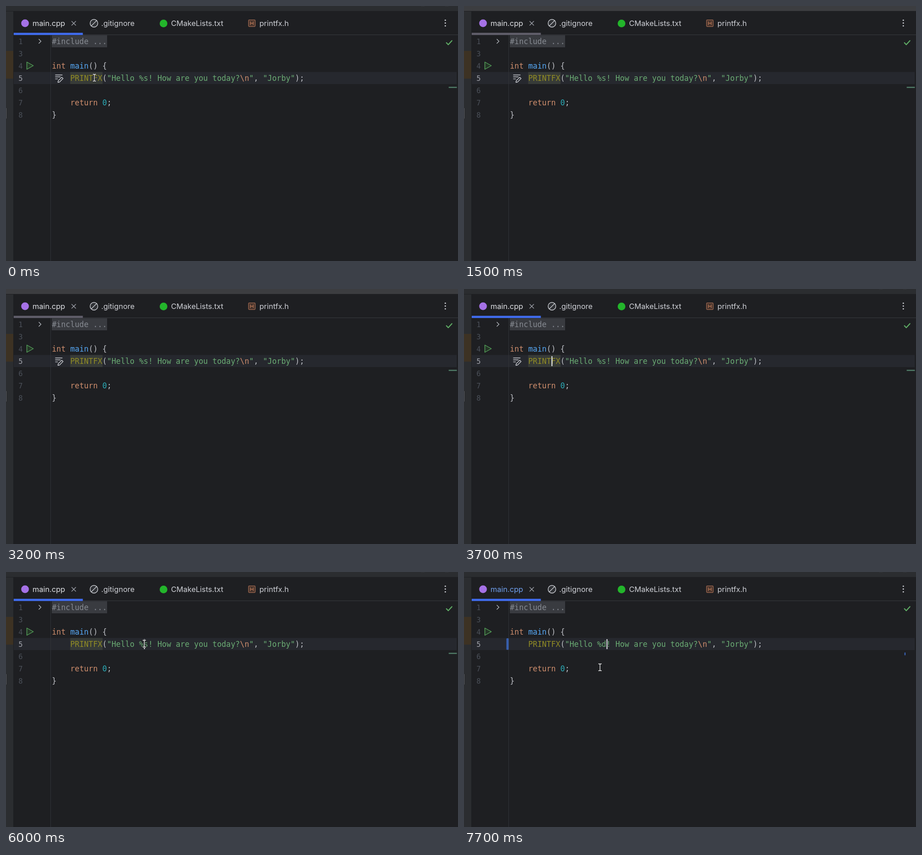
An HTML page for the animation above (8 s loop, 997 by 562 pixels).

```html
<!DOCTYPE html>
<html lang="en">
<head>
<meta charset="utf-8">
<title>Code editor</title>
<style>
  html, body { margin: 0; width: 100%; height: 100%; overflow: hidden; background: #1e1f22; }
  svg { display: block; width: 997px; height: 562px; }
  text { white-space: pre; }
  .code { font: 16.81px "DejaVu Sans Mono", "Noto Sans Mono", monospace; }
  .tab { font: 16.5px Inter, "Open Sans", sans-serif; fill: #ced0d6; }
  .line { fill: none; stroke: #ced0d6; stroke-width: 1.4; stroke-linecap: round; stroke-linejoin: round; }
</style>
</head>
<body>
<svg viewBox="0 0 997 562">
  <rect width="997" height="562" fill="#1e1f22"/>
  <rect id="titleBar" width="997" height="11"/>
  <path id="titleMarks" d="M916 0h7M969 0h7" stroke="#3d3f43"/>
  <rect y="12" width="16" height="550" fill="#2b2d30"/>
  <rect y="99" width="16" height="61" fill="#3d3223"/>
  <rect y="225" width="1" height="23" fill="#5a5d63"/>

  <!-- tabs -->
  <rect x="17" y="63" width="980" height="1" fill="#393b40"/>
  <rect id="underline" x="17" y="59" width="152.5" height="5"/>
  <circle cx="42" cy="38" r="8.5" fill="#a571e6"/>
  <path class="line" d="M145 33.7l8.8 8.8m0-8.8l-8.8 8.8" stroke-width="1.3" style="stroke:#9da0a8"/>
  <g class="line"><circle cx="194" cy="38" r="8.5" fill="#303236"/><path d="M188 44l12-12"/></g>
  <circle cx="347.5" cy="38.5" r="8.5" fill="#23b52b"/>
  <rect x="535" y="30.7" width="14.6" height="14.6" rx="1.5" fill="#45322b" stroke="#a56d53" stroke-width="1.3"/>
  <path d="M539.2 34v8M545.4 34v8M539.2 38h6.2" stroke="#b87858" stroke-width="1.3"/>
  <text id="tabName" class="tab" x="58.5" y="44">main.cpp</text>
  <text class="tab" x="210" y="44">.gitignore</text>
  <text class="tab" x="364" y="44">CMakeLists.txt</text>
  <text class="tab" x="559" y="44">printfx.h</text>
  <g fill="#ced0d6"><circle cx="969" cy="31.3" r="1.5"/><circle cx="969" cy="37.5" r="1.5"/><circle cx="969" cy="43.7" r="1.5"/></g>

  <!-- editor -->
  <rect x="17" y="145.5" width="977" height="26.5" fill="#26282e"/>
  <rect x="98" y="64" width="1" height="498" fill="#313438"/>
  <rect x="101" y="64.5" width="122" height="26.5" fill="#393b40"/>
  <rect id="highlight" x="141.5" y="145.5" width="71.5" height="26.5" fill="#373b38"/>
  <rect id="changeBar" x="93.5" y="146" width="5" height="25.5" rx="1.5" fill="#375fad"/>
  <path class="line" d="M72.6 73.3l4.6 4.5-4.6 4.5" style="stroke:#b4b8bf"/>
  <path class="line" d="M46 123.5v16l14.3-8z" style="stroke:#57a55c;fill:#253627"/>
  <g id="pencil" class="line">
    <path d="M109 152h15M109 156.3h11M109 160.6h5"/>
    <path d="M114.5 168.3l.8-3.8 7.8-7.6 2.8 2.8-7.7 7.8z"/>
  </g>
  <path class="line" d="M971.5 81l4 4.2 8-8.8" style="stroke:#5fad65;stroke-width:2.3"/>
  <rect id="mark" x="976.5" y="178" width="18" height="2.6" fill="#4f7a66"/>
  <rect id="tick" x="971.5" y="177.5" width="2.5" height="6" fill="#375fad"/>
  <g id="code" class="code"></g>
  <rect id="caret" y="148" width="2.2" height="22" fill="#dfe1e5"/>
  <g id="mouse" fill="none" stroke-linecap="square">
    <path d="M-3 -7.5h2l1 1 1-1h2M0 -6.5v13M-3 7.5h2l1-1 1 1h2" stroke="#15161a" stroke-width="3.2"/>
    <path d="M-3 -7.5h2l1 1 1-1h2M0 -6.5v13M-3 7.5h2l1-1 1 1h2" stroke="#fff" stroke-width="1.3"/>
  </g>
</svg>
<script>
const LOOP = 8000, LEFT = 101.2, CHAR = 10.12, ROW = 27;
const $ = id => document.getElementById(id);
const PLAIN = '#bcbec4', KEYWORD = '#cf8e6d', STRING = '#6aab73';

function addText(x, row, str, fill) {
  const el = document.createElementNS('http://www.w3.org/2000/svg', 'text');
  el.setAttribute('x', x);
  el.setAttribute('y', 84 + row * ROW);
  el.setAttribute('fill', fill);
  el.textContent = str;
  $('code').append(el);
  return el;
}
const colX = col => LEFT + col * CHAR;
const token = (row, col, str, fill) => addText(colX(col), row, str, fill);

[1, 3, 4, 5, 6, 7, 8].forEach((n, row) => {
  addText(27.5, row, n, n === 5 ? '#a1a3ab' : '#4b5059').style.fontSize = '15.6px';
});
token(0, 0, '#include ...', '#868a91');
token(2, 0, 'int', KEYWORD);
token(2, 4, 'main', '#56a8f5');
token(2, 8, '() {', PLAIN);
token(3, 4, 'PRINTFX', '#908b25');
token(3, 11, '(', PLAIN);
token(3, 12, '"Hello %', STRING);
const format = token(3, 20, '', STRING);
const escape = token(3, 41, '\\n', KEYWORD);
const quote = token(3, 43, '"', STRING);
const comma = token(3, 44, ',', PLAIN);
const name = token(3, 46, '"Jorby"', STRING);
const ending = token(3, 53, ');', PLAIN);
token(5, 4, 'return', KEYWORD);
token(5, 11, '0', '#2aacb8');
token(5, 12, ';', PLAIN);
token(6, 0, '}', PLAIN);
const tail = [[escape, 41], [quote, 43], [comma, 44], [name, 46], [ending, 53]];

// start time, pointer x, pointer y; no position hides the pointer
const pointer = [
  [0, 195, 158], [200], [4000, 190, 362], [4200, 190, 338], [4500, 191, 262],
  [4700, 192, 226], [5000, 248, 188], [5200, 296, 161], [5500, 305, 158],
  [6500, 302, 190], [6700, 300, 210]
];

const within = (t, from, to) => t >= from && t < to;
const show = (id, on) => { $(id).style.display = on ? '' : 'none'; };

function render(t) {
  const focused = !within(t, 200, 3500);
  const edited = t >= 6700;
  const letter = t < 6700 ? 's' : t < 7000 ? '' : 'd';

  $('titleBar').setAttribute('fill', focused ? '#2b2d30' : '#3c3d40');
  $('underline').setAttribute('fill', focused ? '#3f6ae8' : '#5e5c68');
  $('tabName').style.fill = edited ? '#70a0ee' : '#dfe1e5';
  show('titleMarks', focused);
  show('pencil', t < 5500);
  show('highlight', !edited);
  show('mark', !edited);
  show('changeBar', edited);
  show('tick', edited);

  format.textContent = letter + '! How are you today?';
  const shift = letter ? 0 : -1;
  tail.forEach(([el, col]) => el.setAttribute('x', colX(col + shift)));

  show('caret', t >= 3500 && !within(t, 4000, 4500) && !within(t, 5000, 5500));
  const caretCol = t < 5500 ? 9 : t < 7000 ? 20 : 21;
  $('caret').setAttribute('x', colX(caretCol) + 0.6);

  const [, x, y] = pointer.filter(p => p[0] <= t).pop();
  show('mouse', x !== undefined);
  if (x !== undefined) $('mouse').setAttribute('transform', `translate(${x} ${y})`);
}

const start = performance.now();
function frame() {
  render((performance.now() - start) % LOOP);
  requestAnimationFrame(frame);
}
frame();
</script>
</body>
</html>
```
